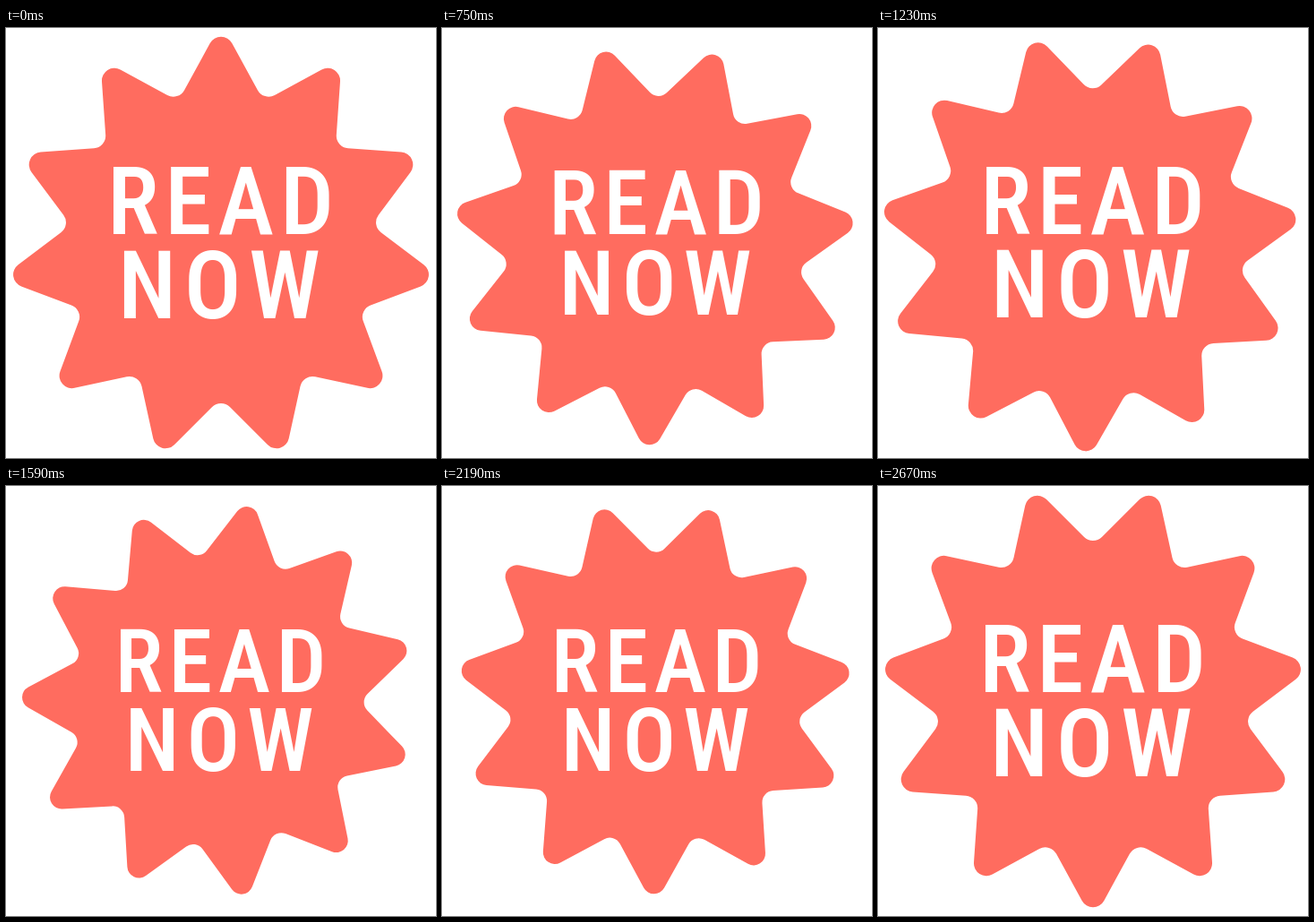
An HTML page with a canvas for the animation above (2700 ms loop, 480 by 480 pixels).

```html
<!DOCTYPE html>
<html lang="en">
<head>
<meta charset="utf-8">
<title>Read now</title>
<style>
  html, body { margin: 0; width: 100%; height: 100%; overflow: hidden; background: #fff; }
  canvas { display: block; }
</style>
</head>
<body>
<canvas id="stage" width="480" height="480"></canvas>
<script>
const ctx = document.getElementById('stage').getContext('2d');

const STEP = 30;
const STEPS = 90;
const PULSE = 20;          // steps per shrink-and-grow
const PULSES_END = 80;     // full size from here on
const SHRINK = 0.0096;     // size lost per step

const POINTS = 11;
const OUTER = 249.3;
const INNER = 169.2;
const ROUND = 14;
const STAR_DROP = 4;       // star centre sits below the pivot

const FONT = '500 condensed 106px "Roboto Condensed", "Open Sans Condensed", "Noto Sans Condensed", Roboto, sans-serif';

function vertex(i) {
  const angle = i * Math.PI / POINTS;
  const radius = i % 2 ? INNER : OUTER;
  return [radius * Math.sin(angle), STAR_DROP - radius * Math.cos(angle)];
}

function makeStar() {
  const path = new Path2D();
  const [ax, ay] = vertex(-1);
  const [bx, by] = vertex(0);
  path.moveTo((ax + bx) / 2, (ay + by) / 2);
  for (let i = 0; i < POINTS * 2; i++) {
    path.arcTo(...vertex(i), ...vertex(i + 1), ROUND);
  }
  path.closePath();
  return path;
}

// Tracks a word so that its ink is centred on the pivot.
function makeLine(text, inkWidth, baseline) {
  ctx.font = FONT;
  ctx.letterSpacing = '0px';
  const m = ctx.measureText(text);
  const ink = m.actualBoundingBoxLeft + m.actualBoundingBoxRight;
  return {
    text,
    baseline,
    x: m.actualBoundingBoxLeft - inkWidth / 2,
    tracking: (inkWidth - ink) / (text.length - 1) + 'px'
  };
}

const star = makeStar();
const lines = [makeLine('READ', 242, -10.3), makeLine('NOW', 218, 83.6)];

function sizeAt(step) {
  if (step >= PULSES_END) return 1;
  const phase = step % PULSE;
  return 1 - SHRINK * Math.min(phase, PULSE - phase);
}

function draw(step) {
  const size = sizeAt(step);
  ctx.setTransform(1, 0, 0, 1, 0, 0);
  ctx.fillStyle = '#fff';
  ctx.fillRect(0, 0, 480, 480);
  ctx.translate(240, 240);
  ctx.scale(size, size);

  ctx.save();
  ctx.rotate(Math.PI * step / (STEPS - 1));
  ctx.fillStyle = '#ff6c5f';
  ctx.fill(star);
  ctx.restore();

  ctx.fillStyle = '#fff';
  ctx.font = FONT;
  for (const { text, x, baseline, tracking } of lines) {
    ctx.letterSpacing = tracking;
    ctx.fillText(text, x, baseline);
  }
}

function tick() {
  draw(Math.floor(performance.now() / STEP) % STEPS);
  requestAnimationFrame(tick);
}
tick();
</script>
</body>
</html>
```
